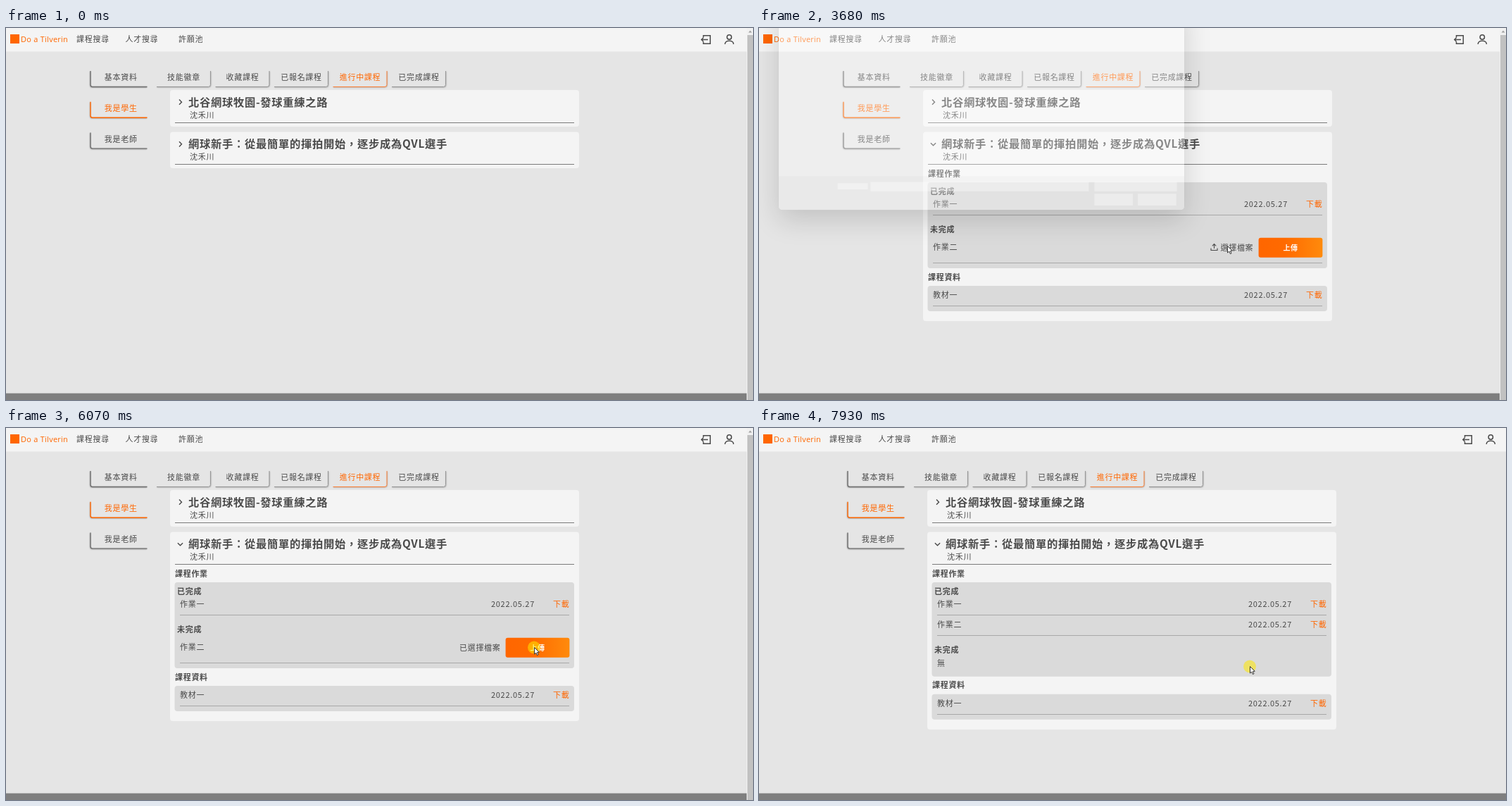
Recreate the animation shown at these times as an HTML page with a canvas. Size 1061 by 528 pixels, loop 8000 ms.

```html
<!DOCTYPE html>
<html lang="zh-Hant">
<head>
<meta charset="utf-8">
<title>課程上傳作業</title>
<style>
html, body { margin: 0; width: 100%; height: 100%; overflow: hidden; background: #e5e5e5; }
canvas { display: block; }
</style>
</head>
<body>
<canvas id="stage" width="1061" height="528"></canvas>
<script>
const W = 1061, H = 528, LOOP = 8000;
const ctx = document.getElementById('stage').getContext('2d');
const CJK = '"Noto Sans CJK TC", "Noto Sans CJK", sans-serif';
const UI = '"Noto Sans", "Noto Sans CJK TC", sans-serif';
const INK = '#4a4a4a', ORANGE = '#ff6600', PANEL = '#f4f4f4', BLUE = '#0067c0';

const clamp = v => Math.min(1, Math.max(0, v));
const progress = (t, a, b) => clamp((t - a) / (b - a));
const smooth = p => p * p * (3 - 2 * p);
const lerp = (a, b, p) => a + (b - a) * p;

// Text is placed by the vertical centre of its glyphs.
function text(s, x, cy, o = {}) {
  const { size = 11, color = INK, weight = 400, align = 'left', gap = 0.7, font = CJK } = o;
  ctx.font = `${weight} ${size}px ${font}`;
  ctx.letterSpacing = gap + 'px';
  ctx.textAlign = align;
  ctx.fillStyle = color;
  ctx.fillText(s, x, cy + size * 0.38);
}
const uiText = (s, x, cy, align = 'left') =>
  text(s, x, cy, { size: 8.4, color: '#1a1a1a', gap: 0, font: UI, align });

function rect(x, y, w, h, color, r = 0, border) {
  ctx.beginPath();
  ctx.roundRect(x, y, w, h, r);
  if (color) { ctx.fillStyle = color; ctx.fill(); }
  if (border) { ctx.strokeStyle = border; ctx.lineWidth = 1; ctx.stroke(); }
}
function disc(x, y, r, color) {
  ctx.beginPath();
  ctx.arc(x, y, r, 0, Math.PI * 2);
  ctx.fillStyle = color;
  ctx.fill();
}
function line(points, color, width = 1) {
  ctx.beginPath();
  points.forEach(([x, y], i) => i ? ctx.lineTo(x, y) : ctx.moveTo(x, y));
  ctx.strokeStyle = color;
  ctx.lineWidth = width;
  ctx.stroke();
}
function poly(points, fill, stroke) {
  ctx.beginPath();
  points.forEach(([x, y]) => ctx.lineTo(x, y));
  ctx.closePath();
  ctx.fillStyle = fill;
  ctx.fill();
  if (stroke) { ctx.strokeStyle = stroke; ctx.lineWidth = 1; ctx.stroke(); }
}
function chevron(x, y, down, size = 3, color = INK, width = 1.4) {
  const h = size * 1.2;
  line(down ? [[x - h, y - size / 2], [x, y + size / 2 + 0.5], [x + h, y - size / 2]]
            : [[x - size / 2, y - h], [x + size / 2 + 0.5, y], [x - size / 2, y + h]], color, width);
}

function drawHeader(iconShift) {
  rect(0, 0, W, 33.5, PANEL);
  rect(6, 9, 13, 13, ORANGE);
  text('Do a Tilverin', 21, 16, { color: ORANGE, weight: 500, gap: 0.25, font: '"Open Sans", sans-serif' });
  text('課程搜尋', 100, 16);
  text('人才搜尋', 169.5, 16);
  text('許願池', 245, 16);
  ctx.save();
  ctx.translate(iconShift, 0);
  line([[990.5, 13.5], [990.5, 10.8], [1000.3, 10.8], [1000.3, 22.2], [990.5, 22.2], [990.5, 19.5]], INK, 1.5);
  line([[997, 16.5], [988, 16.5]], INK, 1.5);
  line([[990.5, 13.8], [987.8, 16.5], [990.5, 19.2]], INK, 1.5);
  ctx.beginPath();
  ctx.arc(1027.3, 13, 3.2, 0, Math.PI * 2);
  ctx.moveTo(1021.2, 23);
  ctx.bezierCurveTo(1021.2, 16.6, 1033.4, 16.6, 1033.4, 23);
  ctx.stroke();
  ctx.restore();
}

// Tab with a rounded two-sided border: left + bottom, or bottom + right.
function drawTab(x, y, w, label, active, side) {
  const near = side ? x + 1 : x + w - 0.5, far = side ? x + w : x;
  const dir = side ? 1 : -1, bottom = y + 22.5;
  ctx.save();
  ctx.beginPath();
  ctx.moveTo(near, y);
  ctx.lineTo(near, bottom - 3);
  ctx.quadraticCurveTo(near, bottom, near + 3 * dir, bottom);
  ctx.lineTo(far, bottom);
  ctx.shadowColor = 'rgba(0,0,0,0.3)';
  ctx.shadowBlur = 1.5;
  ctx.shadowOffsetX = -dir * 0.5;
  ctx.shadowOffsetY = 0.7;
  ctx.strokeStyle = active ? (side ? ORANGE : '#ff8136') : (side ? '#707070' : '#969696');
  ctx.lineWidth = side ? 1.4 : 1;
  ctx.stroke();
  ctx.restore();
  text(label, x + w / 2 + (side ? 3.5 : 0), y + 9.3, { color: active ? ORANGE : INK, align: 'center' });
}

function drawTabs() {
  ['基本資料', '我是學生', '我是老師'].forEach((s, i) => drawTab(119, 61 + i * 43.8, 81.5, s, i === 1, true));
  ['技能徽章', '收藏課程', '已報名課程', '進行中課程', '已完成課程'].forEach((s, i) =>
    drawTab(214 + i * 83.5, 61, 77, s, i === 3, false));
}

function drawCard(y, bottom, title, open) {
  rect(233, y, 581, bottom - y, PANEL, 4);
  chevron(247.5, y + 17.2, open);
  text(title, 259, y + 16.8, { size: 15.3, weight: 700 });
  text('沈禾川', 261, y + 35.7);
  rect(240, Math.round(y + 45.5), 567, 1, '#7b7b7b');
}

const heading = (s, x, cy) => text(s, x, cy, { weight: 700 });
const rule = y => rect(247, Math.round(y - 0.5), 553, 1, '#a8a8a8');

function drawRow(label, cy) {
  text(label, 247, cy);
  text('2022.05.27', 689, cy);
  text('下載', 777, cy, { color: ORANGE });
  rule(cy + 15.7);
}

function drawUploadRow(chosen) {
  text('作業二', 247, 310.5);
  if (chosen) {
    text('已選擇檔案', 644, 312.3);
  } else {
    line([[642, 312.5], [642, 315.5], [651, 315.5], [651, 312.5]], INK, 1.1);
    line([[646.5, 313], [646.5, 306.8]], INK, 1.1);
    line([[643.8, 309.3], [646.5, 306.6], [649.2, 309.3]], INK, 1.1);
    text('選擇檔案', 655.5, 312.3);
  }
  const g = ctx.createLinearGradient(710, 0, 800, 0);
  g.addColorStop(0, '#ff6600');
  g.addColorStop(0.4, '#ff6a00');
  g.addColorStop(1, '#ff8a0c');
  rect(709.6, 297.8, 90.8, 28, g, 3);
  text('上傳', 755, 312, { size: 10, weight: 700, color: '#fff', align: 'center', gap: 0.5 });
  rule(333);
}

function drawDetails(chosen, done) {
  const dy = done ? 11.7 : 0;
  heading('課程作業', 240, 206.5);
  rect(239.5, 219, 567.5, 122 + dy, '#dadada', 4);
  heading('已完成', 243, 231.5);
  drawRow('作業一', 250);
  if (done) {
    drawRow('作業二', 279);
    heading('未完成', 243, 315);
    text('無', 247, 333.5);
  } else {
    heading('未完成', 243, 286);
    drawUploadRow(chosen);
  }
  heading('課程資料', 240, 353.5 + dy);
  rect(239.5, 366 + dy, 567.5, 36, '#dadada', 4);
  drawRow('教材一', 378.8 + dy);
}

function drawPage(t) {
  const wide = t >= 6920, done = t >= 7790;
  const open = smooth(progress(t, 1430, 1760));
  const bottom = lerp(199, done ? 428 : 416, open);
  rect(0, 0, W, H, '#e5e5e5');
  drawHeader(wide ? 12 : 0);
  ctx.save();
  if (wide) ctx.translate(6, 0);
  drawTabs();
  drawCard(88, 140, '北谷網球牧園-發球重練之路', false);
  drawCard(147.6, bottom, '網球新手：從最簡單的揮拍開始，逐步成為QVL選手', open > 0);
  if (open > 0) {
    ctx.beginPath();
    ctx.rect(233, 195, 581, bottom - 195);
    ctx.clip();
    drawDetails(t >= 4970, done);
  }
  ctx.restore();
  rect(0, 518.5, W, 10, '#7f7f7f');
}

function drawScrollbar() {
  rect(1052, 0, 9, H, '#f1f1f1');
  poly([[1054.5, 6.5], [1057, 3.5], [1059.5, 6.5]], '#a0a0a0');
  rect(1053, 10, 8, H, '#c1c1c1');
}

function drawLoader(t) {
  const shown = progress(t, 6200, 6300) * (1 - progress(t, 7790, 7925));
  if (!shown) return;
  ctx.globalAlpha = shown;
  rect(0, 0, W, H, 'rgba(0,0,0,0.5)');
  const phase = Math.PI * (1 + (Math.min(t, 6920) - 6850) / 400);
  const dx = t >= 6920 ? 6 : 0;
  for (let i = 0; i < 3; i++) {
    disc(508 + i * 21.3 + dx, 180 - 2.8 * Math.sin(phase - i * Math.PI * 5 / 6), 7, ORANGE);
  }
  text('資料處理中，請稍後', 529.3 + dx, 207.5, { weight: 700, color: '#fff', align: 'center' });
  ctx.globalAlpha = 1;
}

function drawFolder(x, y) {
  rect(x - 29.5, y - 24, 28, 16, '#e6ae36', 3);
  rect(x - 29.5, y - 18, 59, 20, '#e6ae36', 3);
  const g = ctx.createLinearGradient(0, y - 15, 0, y + 23);
  g.addColorStop(0, '#ffdf8d');
  g.addColorStop(1, '#f9cb5e');
  rect(x - 29.5, y - 14, 59, 37, g, 3);
}
function drawSheet(x, y) {
  poly([[x - 22, y - 28], [x + 12, y - 28], [x + 22, y - 18], [x + 22, y + 30], [x - 22, y + 30]], '#fcfcfc', '#9b9b9b');
  poly([[x + 12, y - 28], [x + 12, y - 18], [x + 22, y - 18]], '#eee', '#9b9b9b');
  rect(x - 29, y - 15, 29, 29, '#107c41');
}
function drawShortcut(x, y) {
  rect(x - 33, y + 22, 11, 11, '#fff', 0, '#d8d8d8');
  line([[x - 31, y + 31], [x - 25, y + 25]], BLUE, 1.5);
  line([[x - 29.5, y + 24.6], [x - 24.6, y + 24.6], [x - 24.6, y + 29.5]], BLUE, 1.5);
}
const circleIcon = (r, c) => (x, y) => disc(x, y, r, c);
const squareIcon = (r, c) => (x, y) => rect(x - r, y - r, r * 2, r * 2, c);

// label, icon painter, is shortcut
const FILES = [
  ['mirutao', drawFolder], ['SERVER-SSL', drawFolder], ['新增資料夾', drawFolder],
  ['Brell', circleIcon(31, '#fb4a1e'), true], ['Demo', drawSheet], ['Parlowy', circleIcon(33.5, '#5562ea'), true],
  ['Binlofe', squareIcon(33.5, '#0a5cf5'), true], ['Velno', squareIcon(33.5, '#222'), true],
  ['index', circleIcon(31, '#e33b2e')], ['Quandrel Rove', circleIcon(33.5, '#1b8fd0'), true],
  ['Quandrel Crews', squareIcon(27, '#5559b8'), true], ['Codegrovel', circleIcon(29.5, '#0a57d0'), true]
];

// label, centre y, icon colour
const PLACES = [
  ['下載', 82, '#1a9c8c'], ['文件', 100, '#8797a8'], ['音樂', 118, '#d8694a'], ['桌面', 136, '#1e88d2'],
  ['圖片', 153.7, '#2b7cc9'], ['影片', 171.5, '#6c3fc0'], ['Orlu (C:)', 189, '#444'], ['Data (D:)', 207, '#444']
];

function drawPlaces() {
  rect(-11, 128, 107.5, 16, '#d9d9d9');
  chevron(8.5, 42.5, false, 2.2, '#666', 1);
  disc(22, 42.5, 5, '#1683d8');
  ctx.save();
  ctx.beginPath();
  ctx.rect(0, 30, 97, 190);
  ctx.clip();
  uiText('Nubstore - Perso', 30, 42.5);
  ctx.restore();
  chevron(8, 64.5, true, 2.2, '#333', 1);
  rect(17, 60, 10.5, 7, '#1687cf', 1);
  rect(20, 68, 5, 1, '#666');
  uiText('本機', 30, 64.5);
  PLACES.forEach(([label, y, color], i) => {
    chevron(14, y, false, 2.2, '#777', 1);
    if (i === 0) {
      line([[27.5, y - 4.5], [27.5, y + 2]], color, 1.3);
      line([[24.5, y - 1], [27.5, y + 2], [30.5, y - 1]], color, 1.3);
      line([[23.5, y + 4.5], [31.5, y + 4.5]], color, 1.3);
    } else if (i === 2) {
      disc(27.5, y, 5, color);
      disc(27.5, y, 1.6, '#fff');
    } else if (i > 5) {
      rect(23, y - 0.5, 10, 3, color, 1);
      if (i === 6) rect(23, y - 5, 4, 3.5, '#1687cf');
    } else {
      rect(22.5, y - 4.5, 10, 9, color, 1);
      if (i === 4) poly([[23.5, y + 3.5], [27, y - 1], [31, y + 3.5]], '#fff');
      if (i === 5) poly([[26, y - 2.5], [30, y], [26, y + 2.5]], '#fff');
      if (i === 1) rect(25, y - 2.5, 5, 1, '#fff');
    }
    uiText(label, 36, y);
  });
  rect(100.5, 125, 3.5, 82, '#858585', 2);
}

function drawToolbar() {
  rect(-11, 6, 654, 21.5, '#f5f5f5');
  uiText('組合管理', 12, 16.5);
  poly([[48, 15.5], [53, 15.5], [50.5, 18.5]], '#333');
  uiText('新增資料夾', 73, 16.5);
  rect(559.5, 12.5, 7.5, 7.5, null, 1, '#444');
  poly([[575.5, 15.5], [580.5, 15.5], [578, 18.5]], '#333');
  rect(596.5, 13, 10, 7.5, '#fff', 0, '#5b86ad');
  rect(602, 13, 4.5, 7.5, '#1687d8');
  disc(626.5, 16.5, 5.7, BLUE);
  text('?', 626.5, 16.5, { size: 8, color: '#fff', weight: 700, align: 'center', gap: 0, font: UI });
}

function drawFiles(hoverDemo) {
  if (hoverDemo) rect(459.5, 32, 73.5, 81.5, '#e5f3ff');
  FILES.forEach(([label, icon, shortcut], i) => {
    const x = 157 + (i % 6) * 84.7, y = i < 6 ? 67 : 149.5;
    icon(x, y);
    if (shortcut) drawShortcut(x, y);
    uiText(label, x, y + 39, 'center');
  });
  ctx.save();
  ctx.beginPath();
  ctx.rect(109, 200, 520, 24);
  ctx.clip();
  disc(166, 232, 23, '#f9b32c');
  ctx.restore();
}

function drawDialogFooter() {
  uiText('檔案名稱(N):', 141, 240, 'right');
  rect(145.5, 232.5, 345, 15, '#fff', 1, '#1a7ccc');
  rect(148, 235, 1, 10, '#222');
  chevron(485, 240, true, 2, '#555', 1);
  rect(499.5, 232.5, 130, 15, '#fff', 1, '#d5d5d5');
  uiText('所有檔案', 502, 240);
  chevron(624, 240, true, 2, '#555', 1);
  rect(499.5, 252.5, 60, 17, '#fdfdfd', 2, BLUE);
  uiText('開啟(O)', 529.8, 261, 'center');
  rect(569.5, 252.5, 60, 17, '#fdfdfd', 2, '#d0d0d0');
  uiText('取消', 599.3, 261, 'center');
  for (let i = 0; i < 3; i++) for (let j = 0; j <= i; j++) rect(635 + i * 2.4, 276 - j * 2.4, 1.3, 1.3, '#999');
}

function drawDialogContent(hoverDemo) {
  drawToolbar();
  rect(97, 27.5, 11.5, 196.5, '#f2f2f2');
  rect(631.5, 27.5, 11.5, 196.5, '#f2f2f2');
  rect(635.5, 40, 3.5, 122, '#858585', 2);
  drawPlaces();
  drawFiles(hoverDemo);
  drawDialogFooter();
}

function drawDialog(t, cursor) {
  const opening = progress(t, 3600, 3800), closing = progress(t, 4740, 4900);
  const alpha = opening ** 1.2 * (1 - closing);
  if (!alpha) return;
  const scale = 0.8 + 0.2 * opening - 0.12 * closing;
  ctx.save();
  ctx.translate(316, 111);
  ctx.scale(scale, scale);
  ctx.translate(-316, -111);
  ctx.globalAlpha = alpha;

  // The shadow is kept outside so that it does not tint the translucent sheet.
  ctx.save();
  ctx.beginPath();
  ctx.rect(-200, -200, 1600, 1200);
  ctx.roundRect(-11, -56, 654, 334, 5);
  ctx.clip('evenodd');
  ctx.shadowColor = 'rgba(0,0,0,0.45)';
  ctx.shadowBlur = 38;
  ctx.shadowOffsetY = 14;
  rect(-11, -56, 654, 334, '#888', 5);
  ctx.restore();

  ctx.beginPath();
  ctx.roundRect(-11, -56, 654, 334, 5);
  ctx.clip();
  rect(-11, -56, 654, 280, '#fff');
  rect(-11, 224, 654, 54, '#f0f0f0');
  if (t < 3800) {
    rect(84, 235, 49, 10, '#fff');
    rect(137, 233, 352, 15, '#fff');
    rect(498, 233, 133, 15, '#fff');
    rect(498, 252, 62, 19, '#fff');
    rect(568, 252, 62, 19, '#fff');
  } else {
    drawDialogContent(cursor.x > 459 && cursor.x < 533 && cursor.y < 113);
  }
  ctx.restore();
}

// time, x, y of the pointer tip
const PATH = [
  [190, 976, 470], [820, 272, 137], [950, 255, 158], [1020, 253, 160], [1230, 250, 163], [2060, 250, 163],
  [2840, 641, 305], [2900, 642, 305], [3200, 665, 309], [4100, 665, 309], [4380, 498, 106], [4520, 496, 84],
  [4920, 496, 84], [5670, 750, 311], [7270, 750, 311], [7650, 697, 338], [LOOP, 697, 338]
];
const CLICKS = [1430, 3340, 4560, 4690, 5940, 7790];

function cursorAt(t) {
  const i = Math.max(1, PATH.findIndex(k => k[0] > t));
  const [t0, x0, y0] = PATH[i - 1], [t1, x1, y1] = PATH[i];
  const p = smooth(progress(t, t0, t1));
  return { x: lerp(x0, x1, p), y: lerp(y0, y1, p) };
}

function drawHand() {
  ctx.beginPath();
  ctx.moveTo(-1.2, 8);
  ctx.lineTo(-1.2, 1);
  ctx.quadraticCurveTo(0, -0.8, 1.2, 1);
  ctx.lineTo(1.2, 5);
  ctx.lineTo(5, 5.8);
  ctx.quadraticCurveTo(6.3, 6.2, 6.2, 8);
  ctx.lineTo(5, 13.5);
  ctx.lineTo(-0.8, 13.5);
  ctx.lineTo(-4, 8.5);
  ctx.quadraticCurveTo(-3.5, 6.6, -1.2, 8.4);
  ctx.closePath();
  ctx.fillStyle = '#fff';
  ctx.fill();
  ctx.strokeStyle = '#333';
  ctx.lineWidth = 0.9;
  ctx.stroke();
}
const drawArrow = () =>
  poly([[0.5, 0.5], [0.5, 10], [2.8, 8], [4.3, 11.5], [6, 10.8], [4.5, 7.4], [7.3, 7.2]], '#fff', '#333');

function drawCursor(t, { x, y }) {
  if (t < 190) return;
  const click = CLICKS.findLast(c => t >= c && t < c + 210);
  if (click) disc(x, y + 0.5, lerp(5, 9, progress(t, click, click + 70)), 'rgba(255,232,0,0.55)');
  ctx.save();
  ctx.translate(x, y);
  if (t >= 1000 && t < 2120) drawHand();
  else drawArrow();
  ctx.restore();
}

const start = performance.now();
function frame(now) {
  const t = Math.max(0, now - start) % LOOP;
  const cursor = cursorAt(t);
  drawPage(t);
  drawLoader(t);
  if (t < 6920) drawScrollbar();
  drawDialog(t, cursor);
  drawCursor(t, cursor);
  requestAnimationFrame(frame);
}
requestAnimationFrame(frame);
</script>
</body>
</html>
```
